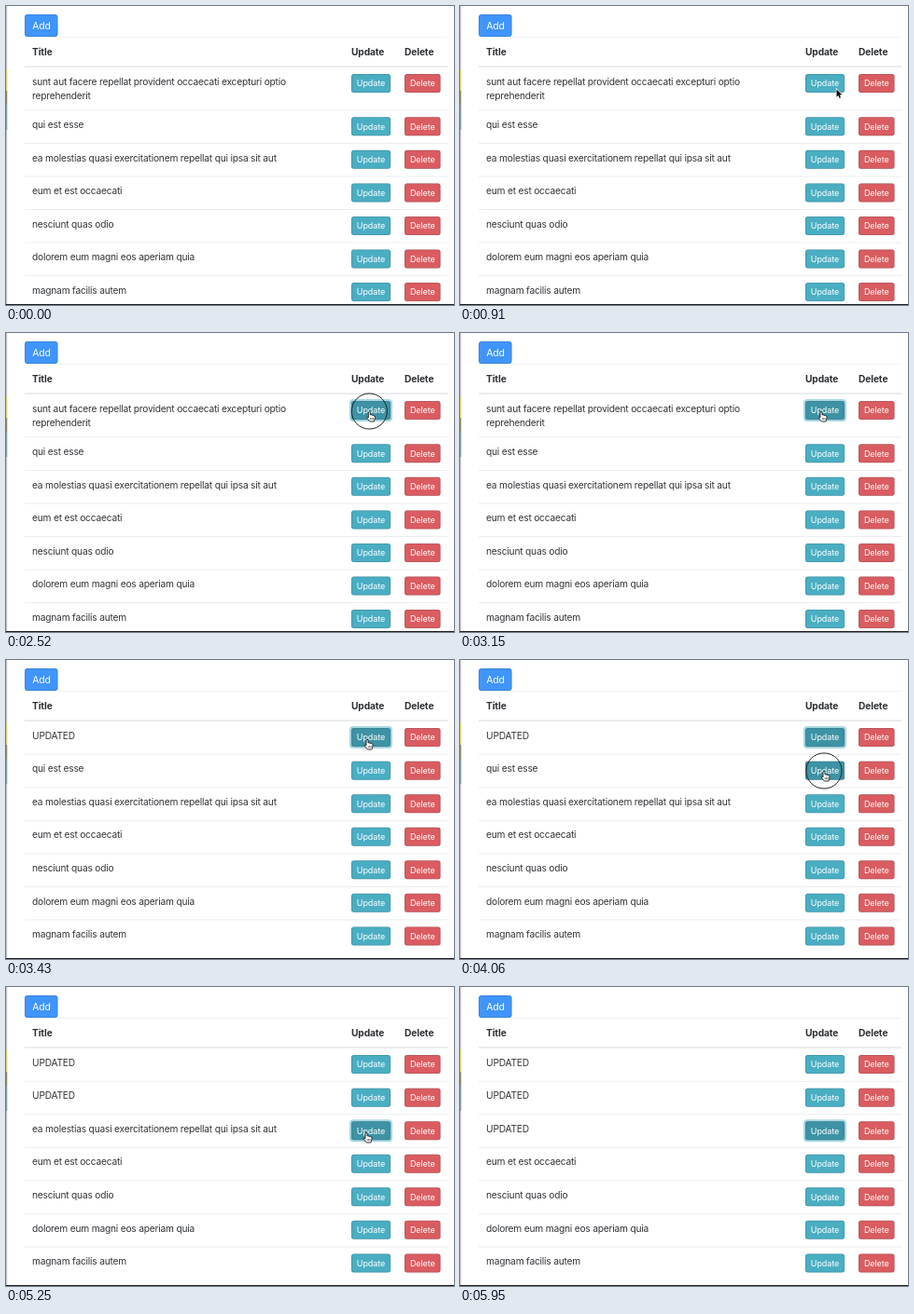
Recreate the animation shown at these times as an HTML page with a canvas. Size 480 px wide and 321 px high, loop 6300 ms.

```html
<!DOCTYPE html>
<html lang="en">
<head>
<meta charset="utf-8">
<title>Table updates</title>
<style>
html, body { margin: 0; width: 100%; height: 100%; overflow: hidden; background: #fff; }
canvas { display: block; width: 480px; height: 321px; }
</style>
</head>
<body>
<canvas id="stage"></canvas>
<script>
const LOOP = 6300, STEP = 70, LAST = 5950;
const canvas = document.getElementById('stage');
const ratio = window.devicePixelRatio || 1;
canvas.width = 480 * ratio;
canvas.height = 321 * ratio;
const ctx = canvas.getContext('2d');

const titles = [
  ['sunt aut facere repellat provident occaecati excepturi optio', 'reprehenderit'],
  ['qui est esse'],
  ['ea molestias quasi exercitationem repellat qui ipsa sit aut'],
  ['eum et est occaecati'],
  ['nesciunt quas odio'],
  ['dolorem eum magni eos aperiam quia'],
  ['magnam facilis autem']
];
const updatedAt = [3220, 4550, 5320];
const focusedAt = [2450, 4130, 5040];
const clicks = [1680, 2310, 3850, 4900];
const PRESS = 210, ACTIVE = 1890;

// time, x, y of the pointer tip
const path = [
  [770, 418, 132], [910, 403.5, 89.5], [1190, 399, 86], [1540, 396, 84.5],
  [1890, 396, 84.5], [2240, 390, 84], [3150, 387, 84], [3430, 387, 85],
  [3780, 390, 119], [4200, 390, 119], [4480, 387, 140], [4760, 385, 161],
  [4970, 386, 156], [5460, 386, 156], [5740, 386, 158], [5880, 386, 158]
];

function pointerAt(t) {
  if (t < path[0][0] || t >= path[path.length - 1][0]) return null;
  const i = path.findIndex(p => p[0] > t);
  const [t0, x0, y0] = path[i - 1], [t1, x1, y1] = path[i];
  const u = (t - t0) / (t1 - t0), k = u * u * (3 - 2 * u);
  return { x: x0 + (x1 - x0) * k, y: y0 + (y1 - y0) * k };
}

function text(str, x, y, size, color, weight = 400, spacing = -0.2, align = 'left') {
  ctx.font = `${weight} ${size}px Inter, "Open Sans", sans-serif`;
  ctx.letterSpacing = spacing + 'px';
  ctx.textAlign = align;
  ctx.fillStyle = color;
  ctx.fillText(str, x, y);
}

function box(x, y, w, h, r, color) {
  ctx.fillStyle = color;
  ctx.beginPath();
  ctx.roundRect(x, y, w, h, r);
  ctx.fill();
}

function bar(x, y, w, h, color) {
  ctx.fillStyle = color;
  ctx.fillRect(x, y, w, h);
}

function edge(x, y, w, h, r) {
  ctx.strokeStyle = 'rgba(50, 70, 85, 0.25)';
  ctx.lineWidth = 0.8;
  ctx.beginPath();
  ctx.roundRect(x + 0.4, y + 0.4, w - 0.8, h - 0.8, r);
  ctx.stroke();
}

function button(label, x, cy, w, color, ring) {
  if (ring) box(x - 2, cy - 12, w + 4, 24, 4, '#a9d8e1');
  box(x, cy - 10, w, 20, 2.5, color);
  edge(x, cy - 10, w, 20, 2.5);
  text(label, x + w / 2, cy + 3.3, 9, '#fff', 400, -0.1, 'center');
}

function shape(points) {
  ctx.beginPath();
  points.forEach(([x, y]) => ctx.lineTo(x, y));
  ctx.closePath();
}

function arrow() {
  shape([[0, 0], [0, 8.2], [1.8, 6.5], [3.1, 9.4], [4.5, 8.7], [3.3, 6], [5.8, 5.8]]);
  ctx.strokeStyle = '#fff';
  ctx.lineWidth = 1.4;
  ctx.stroke();
  ctx.fillStyle = '#111';
  ctx.fill();
}

function hand() {
  ctx.beginPath();
  ctx.moveTo(-1, 6);
  ctx.lineTo(-1, 1);
  ctx.quadraticCurveTo(0, -0.8, 1, 1);
  ctx.lineTo(1, 4);
  ctx.quadraticCurveTo(2.2, 3.2, 3, 4.4);
  ctx.quadraticCurveTo(4.2, 3.8, 4.7, 5);
  ctx.quadraticCurveTo(6, 4.6, 6.2, 6);
  ctx.lineTo(5.6, 9);
  ctx.lineTo(4.9, 11);
  ctx.lineTo(0.3, 11);
  ctx.lineTo(-3, 6.8);
  ctx.quadraticCurveTo(-2.6, 5.2, -1, 6.8);
  ctx.closePath();
  ctx.fillStyle = '#fff';
  ctx.fill();
  ctx.strokeStyle = '#222';
  ctx.lineWidth = 0.9;
  ctx.stroke();
  ctx.lineWidth = 0.6;
  for (const x of [1.2, 2.7, 4.1]) {
    ctx.beginPath();
    ctx.moveTo(x, 7);
    ctx.lineTo(x, 9.3);
    ctx.stroke();
  }
}

function pointer(t, p) {
  ctx.save();
  ctx.translate(p.x, p.y);
  if (t < ACTIVE) arrow();
  else hand();
  const start = clicks.find(c => t >= c && t <= c + PRESS);
  if (start !== undefined) {
    ctx.strokeStyle = '#222';
    ctx.lineWidth = 1;
    ctx.beginPath();
    ctx.arc(0, 0, 5 + (t - start) * 0.067, 0, Math.PI * 2);
    ctx.stroke();
  }
  ctx.restore();
}

function frame() {
  bar(0, 0, 1.2, 321, '#bfc2c4');
  bar(0, 68, 1.2, 23, '#d9d66e');
  bar(0, 91, 1.2, 15, '#8b8a66');
  bar(0, 106, 1.2, 27, '#819ba0');
  bar(0, 320, 480, 1, '#1b1b1b');
}

function header() {
  box(20, 9, 35.5, 24, 3, '#3f95fb');
  edge(20, 9, 35.5, 24, 3);
  text('Add', 38, 24.8, 10.4, '#fff', 400, -0.1, 'center');
  bar(20, 33, 453, 1, '#f0f2f3');
  text('Title', 28, 52.6, 10.2, '#2c2f33', 700, -0.1);
  text('Update', 370, 52.6, 10.2, '#2c2f33', 700, -0.1);
  text('Delete', 427, 52.6, 10.2, '#2c2f33', 700, -0.1);
  bar(20, 64.4, 453, 1.3, '#dfe3e7');
}

function draw(t) {
  ctx.setTransform(ratio, 0, 0, ratio, 0, 0);
  bar(0, 0, 480, 321, '#fff');
  header();
  const p = pointerAt(t);
  const focus = focusedAt.filter(f => t >= f).length - 1;
  let top = 65.2;
  titles.forEach((title, i) => {
    const lines = t >= updatedAt[i] ? ['UPDATED'] : title;
    const cy = top + 17.9;
    if (i) bar(20, top, 453, 1, '#eaedef');
    lines.forEach((s, n) => text(s, 28, top + 19.6 + n * 15.4, 10.2, '#303337'));
    const hover = p && t >= ACTIVE && Math.abs(p.y - cy) < 10 && p.x > 370 && p.x < 412;
    button('Update', 370, cy, 42, hover || i === focus ? '#3d93a5' : '#4aaec3', i === focus);
    button('Delete', 427, cy, 38.5, '#da5c60');
    top += lines.length > 1 ? 46.2 : 35.55;
  });
  frame();
  if (p) pointer(t, p);
}

const begin = performance.now();
function tick() {
  const t = (performance.now() - begin) % LOOP;
  draw(Math.min(LAST, Math.floor(t / STEP) * STEP));
  requestAnimationFrame(tick);
}
tick();
</script>
</body>
</html>
```
